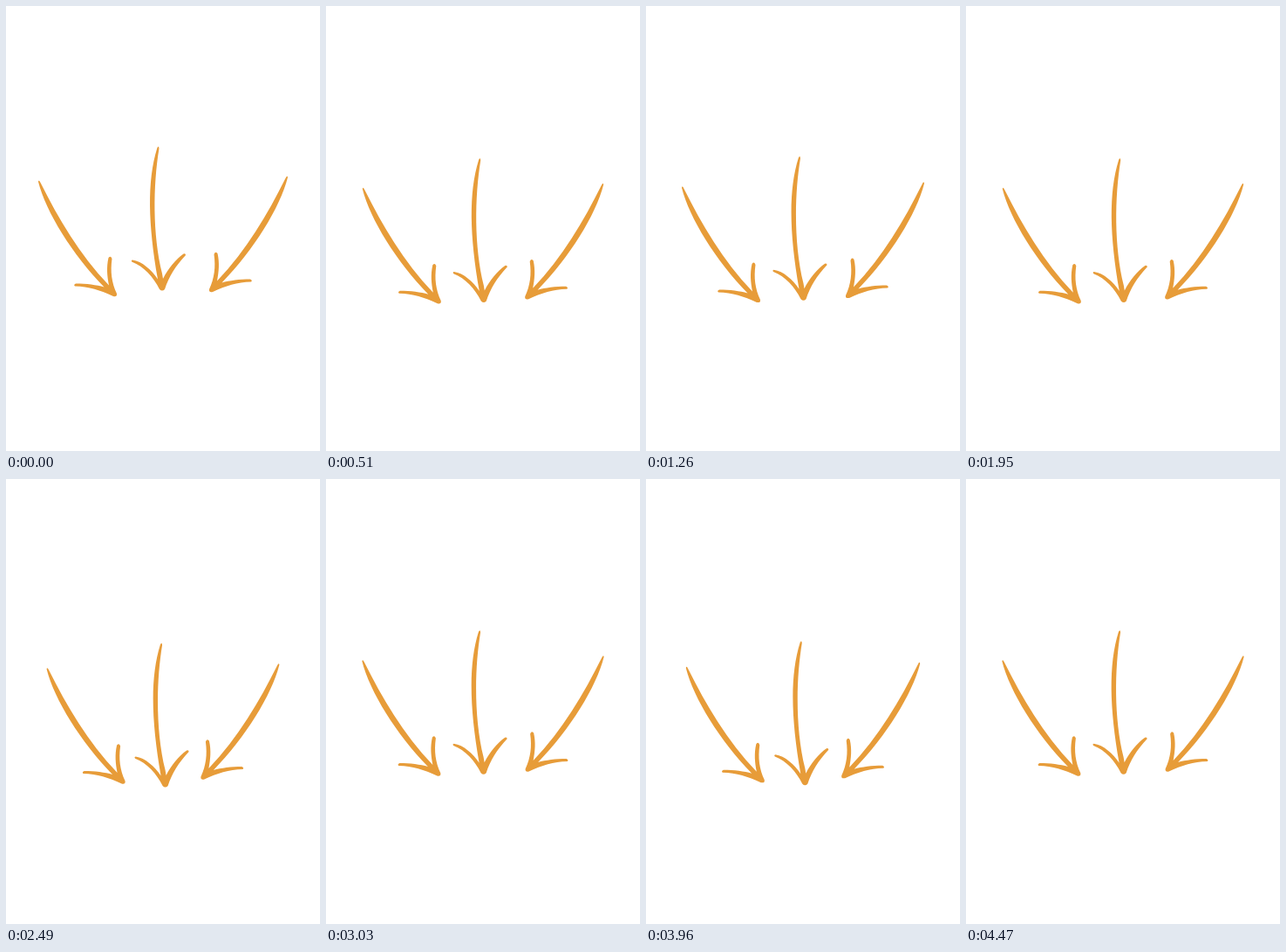
An HTML page for the animation above (4500 ms loop, 360 by 509 pixels).

```html
<!DOCTYPE html>
<html lang="en">
<head>
<meta charset="utf-8">
<title>Arrows</title>
<style>
  html, body { margin: 0; width: 100%; height: 100%; overflow: hidden; background: #fff; }
  svg { display: block; width: 100%; height: 100%; fill: #e79c39; }
</style>
</head>
<body>
<svg viewBox="0 0 360 509">
  <defs>
    <path id="side" d="M37 201C46 236 76 284 112.5 321.5C104 319 92 317.5 80 317.5Q77 319 79 320.5
      C95 321 108 325 123 332Q127.5 333 127 329C121 316 119.5 304 121.5 289Q120 285 117.5 288
      C115 299 116 309 118 319.5C84 284 60 243 39.5 202Q37.5 198 37 201Z"/>
  </defs>
  <g id="left"><use href="#side"/></g>
  <g id="middle">
    <path d="M173.3 162.5C161.5 200 163 250 174 312.5C167 302 156 292 145 290.5Q143 291 144.5 292.8
      C158 298 169 310 176 324Q179 327 182 324C187 309 194 298 206 285Q206 282.5 203.5 283.5
      C194.5 290 186 300 180 312L179 306C168 262 168.5 205 175.5 163Q175 159 173.3 162.5Z"/>
  </g>
  <g id="right"><use href="#side" transform="translate(360 -5) scale(-1 1)"/></g>
</svg>
<script>
  const LOOP = 4500, STEP = 30, CYCLE = 24, PEAK = 11;
  const travel = { left: [9.6, 16.5], middle: [3.6, 27], right: [-9.6, 16.5] };
  const arrows = Object.entries(travel).map(([id, d]) => [document.getElementById(id), d]);

  // Steady push out to the peak, then a steady return.
  function reach(step) {
    const k = step % CYCLE;
    return k <= PEAK ? k / PEAK : (CYCLE - 1 - k) / (CYCLE - 1 - PEAK);
  }

  const start = performance.now();
  function draw(now) {
    const time = Math.max(0, now - start) % LOOP;
    const u = reach(Math.floor(time / STEP));
    for (const [el, [dx, dy]] of arrows) {
      el.setAttribute('transform', `translate(${dx * u} ${dy * u})`);
    }
    requestAnimationFrame(draw);
  }
  draw(start);
</script>
</body>
</html>
```
